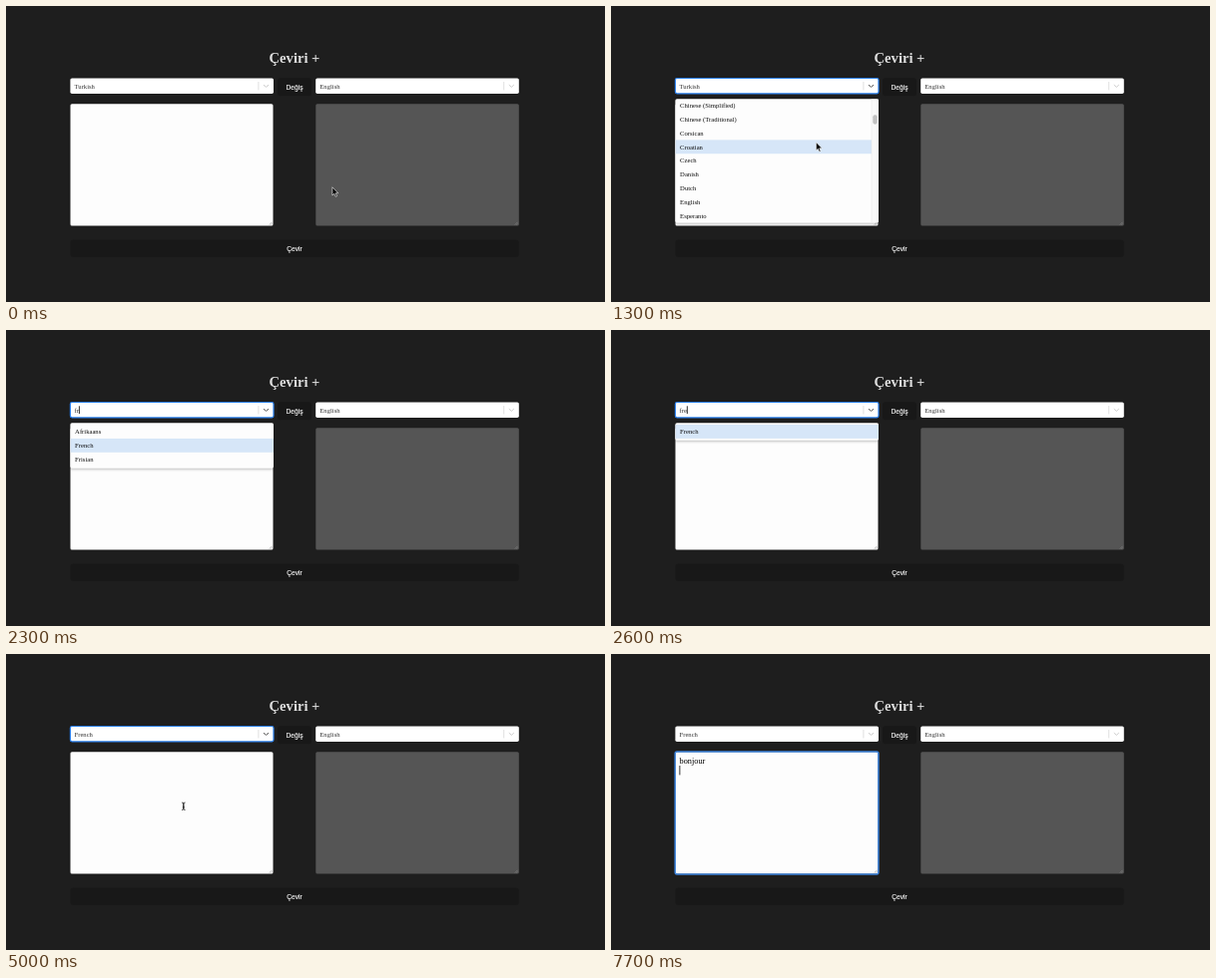
Animation, 600 px wide and 297 px high, one loop 8000 ms. Source, as an HTML page:

```html
<!DOCTYPE html>
<html lang="tr">
<head>
<meta charset="utf-8">
<title>Çeviri</title>
<style>
  html, body { margin: 0; width: 100%; height: 100%; overflow: hidden; background: #1e1e1e; }
  svg { display: block; width: 600px; height: 297px; }
  text { font: 6.64px "Liberation Serif", "Times New Roman", serif; fill: #333; white-space: pre; }
  .title { font-size: 14.6px; font-weight: bold; fill: #dedede; text-anchor: middle; }
  .label { font-family: "Liberation Sans", Arial, sans-serif; fill: #fff; stroke: #fff; stroke-width: .12; text-anchor: middle; }
  .option { fill: #0c0c0c; }
  .area { font-size: 8.25px; fill: #000; }
  .empty { fill: #999; text-anchor: middle; }
</style>
</head>
<body>
<svg viewBox="0 0 600 297" xmlns="http://www.w3.org/2000/svg">
  <defs>
    <clipPath id="listClip"><rect id="clipBox" x="64.4" y="93.5" width="203.6"/></clipPath>
    <filter id="shadow" x="-5%" y="-20%" width="110%" height="150%">
      <feDropShadow dx="0" dy="1.4" stdDeviation="1.1" flood-color="#000" flood-opacity=".25"/>
    </filter>
    <g id="selectBox">
      <rect x="64.4" y="72.4" width="203.6" height="15.5" rx="1.7" fill="#fff"/>
      <path d="M252.9 76v8.4" stroke="#ccc" stroke-width=".6"/>
    </g>
    <path id="chevron" d="M258 79.1l2.5 2.3 2.5-2.3" fill="none" stroke-width="1"/>
    <path id="grip" d="M263.8 219.6l2.8-2.8M265.5 219.6l1.1-1.1" stroke-width=".5"/>
  </defs>
  <rect width="600" height="297" fill="#1e1e1e"/>
  <text class="title" x="289" y="56.8">Çeviri +</text>

  <g fill="#181818">
    <rect x="272" y="72.2" width="34" height="18" rx="3"/>
    <rect x="64.4" y="234.5" width="449.4" height="17.4" rx="3"/>
  </g>
  <text class="label" x="289" y="83.5">Değiş</text>
  <text class="label" x="289" y="245.5">Çevir</text>

  <use href="#selectBox" x="245.8"/>
  <use href="#chevron" x="245.8" stroke="#ccc"/>
  <text x="314.3" y="82.5">English</text>
  <rect x="310.3" y="98.2" width="203.5" height="122.4" rx="1.6" fill="#555"/>
  <use href="#grip" x="246" stroke="#999"/>

  <rect x="64.5" y="98.2" width="203" height="122.4" rx="1.6" fill="#fdfdfd"/>
  <use href="#grip" stroke="#777"/>
  <rect id="areaRing" x="64.2" y="97.9" width="203.7" height="123" rx="1.8" fill="none" stroke="#3f86e0" stroke-width="1.5"/>
  <text id="areaText" class="area" x="68.6" y="109.8"></text>

  <use href="#selectBox"/>
  <use id="arrow" href="#chevron"/>
  <rect id="selectRing" x="64.4" y="72.5" width="203.6" height="15.3" rx="1.7" fill="none" stroke="#2b80ee" stroke-width="1.2"/>
  <text id="value" x="68.5" y="82.5"></text>

  <g id="menu">
    <rect id="menuBox" x="64.4" y="93.3" width="203.6" rx="1.7" fill="#fdfdfd" filter="url(#shadow)"/>
    <g clip-path="url(#listClip)">
      <rect id="mark" x="64.4" height="13.9" fill="#d6e6f8"/>
      <g id="options"></g>
    </g>
    <g id="bar">
      <rect x="261" y="93.6" width="6.8" height="123.4" fill="#f8f8f8"/>
      <path d="M261 93.6v123.4" stroke="#e6e6e6" stroke-width=".5"/>
      <rect id="thumb" x="262.3" width="4.4" height="9.4" rx="2.1" fill="#c1c1c1"/>
    </g>
    <text id="empty" class="empty" x="166.2" y="104.2">No options</text>
  </g>

  <rect id="caret" width=".8" fill="#000"/>
  <path id="pointer" d="M0 0v8.2l1.9-1.7 1.3 3 1.4-.6-1.3-2.9h2.6z" fill="#000" stroke="#fff" stroke-width=".6"/>
  <path id="beam" d="M-1.7-3.7q1.7 0 1.7 1v5.4q0 1-1.7 1M1.7-3.7q-1.7 0-1.7 1v5.4q0 1 1.7 1M-.9 1h1.8" fill="none" stroke="#111" stroke-width=".8"/>
</svg>
<script>
const LOOP = 8000, ROW = 13.9, LIST_TOP = 95, MENU_MAX = 124;
const LANGUAGES = ("Afrikaans,Albanian,Amharic,Arabic,Armenian,Azerbaijani,Basque,Belarusian,Bengali,Bosnian," +
  "Bulgarian,Catalan,Cebuano,Chichewa,Chinese (Simplified),Chinese (Traditional),Corsican,Croatian,Czech," +
  "Danish,Dutch,English,Esperanto,Estonian,Filipino,Finnish,French,Frisian,Galician,Georgian,German," +
  "Greek,Gujarati,Haitian Creole,Hausa,Hawaiian").split(",");
const FRENCH_SCROLL = 315.4;

const OPEN = 800, PICKED = 4500, AREA_FOCUS = 5200;
const QUERY = [[0, ""], [2000, "f"], [2300, "fr"], [2500, "fre"], [3000, "frec"], [4100, "fre"], [PICKED, ""]];
const AREA = [[0, ""], [5900, "b"], [6100, "bo"], [6400, "bon"], [6800, "bonj"], [7000, "bonjo"],
  [7300, "bonjou"], [7500, "bonjour"], [7700, "bonjour\n"]];
const POINTER = [[0, 327, 182], [100, 318, 160], [300, 278, 92], [450, 246, 58], [650, 226, 72], [800, 220, 82],
  [950, 218, 105], [1050, 218, 105], [1350, 203, 143], [1500, 202, 145.5]];
const BEAM = [[4900, 196, 148], [5150, 151, 159.8]];

// Advance widths in em, used to place the caret.
const ADVANCE = { f: .333, r: .333, e: .444, c: .444, j: .278 };
const widthOf = (s, size) => [...s].reduce((w, ch) => w + (ADVANCE[ch] || .5), 0) * size;

const $ = id => document.getElementById(id);
const set = (id, attrs) => { for (const k in attrs) $(id).setAttribute(k, attrs[k]); };
const show = (id, on) => set(id, { visibility: on ? "inherit" : "hidden" });
const move = (id, [x, y]) => set(id, { transform: `translate(${x} ${y})` });
const clamp01 = v => Math.max(0, Math.min(1, v));
const smooth = v => v * v * (3 - 2 * v);
const latest = (steps, t) => steps.filter(s => s[0] <= t).pop();

function along(path, t) {
  const i = path.findIndex(p => p[0] > t);
  if (i < 0) return path[path.length - 1].slice(1);
  if (i === 0) return path[0].slice(1);
  const a = path[i - 1], b = path[i], k = (t - a[0]) / (b[0] - a[0]);
  return [1, 2].map(n => a[n] + (b[n] - a[n]) * k);
}

const optionTexts = LANGUAGES.map(name => {
  const el = document.createElementNS("http://www.w3.org/2000/svg", "text");
  el.textContent = name;
  el.setAttribute("class", "option");
  el.setAttribute("x", 69.1);
  $("options").append(el);
  return el;
});

function drawMenu(t, query) {
  const scroll = query ? 0 : FRENCH_SCROLL * smooth(clamp01((t - 1050) / 430));
  const found = LANGUAGES.filter(n => n.toLowerCase().includes(query));
  const height = Math.min(MENU_MAX, Math.max(1, found.length) * ROW + 3.4);
  const hovered = Math.floor((along(POINTER, t)[1] - LIST_TOP + scroll) / ROW);
  const active = query ? found.indexOf("French") : Math.max(0, hovered);
  const long = found.length * ROW > MENU_MAX;

  LANGUAGES.forEach((name, i) => {
    const row = found.indexOf(name);
    optionTexts[i].setAttribute("visibility", row < 0 ? "hidden" : "inherit");
    optionTexts[i].setAttribute("y", LIST_TOP + row * ROW + 9.2 - scroll);
  });
  set("menuBox", { height });
  set("clipBox", { height: height - 1.2 });
  set("mark", { y: LIST_TOP + active * ROW - scroll, width: long ? 196.6 : 203.6 });
  show("mark", active >= 0);
  show("empty", !found.length);
  show("bar", long);
  set("thumb", { y: 94.2 + scroll * .0765 });
}

function draw(t) {
  const [typedAt, query] = latest(QUERY, t);
  const [wroteAt, written] = latest(AREA, t);
  const inSelect = t >= OPEN && t < AREA_FOCUS, inArea = t >= AREA_FOCUS;
  const open = t >= OPEN && t < PICKED;

  show("selectRing", inSelect);
  show("areaRing", inArea);
  set("arrow", { stroke: inSelect ? "#555" : "#ccc" });
  $("value").textContent = query || (t < PICKED ? "Turkish" : "French");
  $("areaText").textContent = written.trim();

  show("menu", open);
  if (open) drawMenu(t, query);

  const since = Math.max(inArea ? AREA_FOCUS : OPEN, inArea ? wroteAt : typedAt);
  const caretOn = (inSelect || inArea) && Math.floor((t - since) / 500) % 2 === 0;
  const line = written.split("\n");
  show("caret", caretOn);
  set("caret", inArea
    ? { x: 68.5 + widthOf(line[line.length - 1], 8.25), y: 102.4 + (line.length - 1) * 9.6, height: 9.4 }
    : { x: 68.5 + widthOf(query, 6.64), y: 76.3, height: 7.8 });

  show("pointer", t < 2000);
  move("pointer", along(POINTER, t));
  show("beam", t >= 4900 && t < 5900);
  move("beam", along(BEAM, t));
}

function tick(now) {
  draw(now % LOOP);
  requestAnimationFrame(tick);
}
draw(0);
requestAnimationFrame(tick);
</script>
</body>
</html>
```
